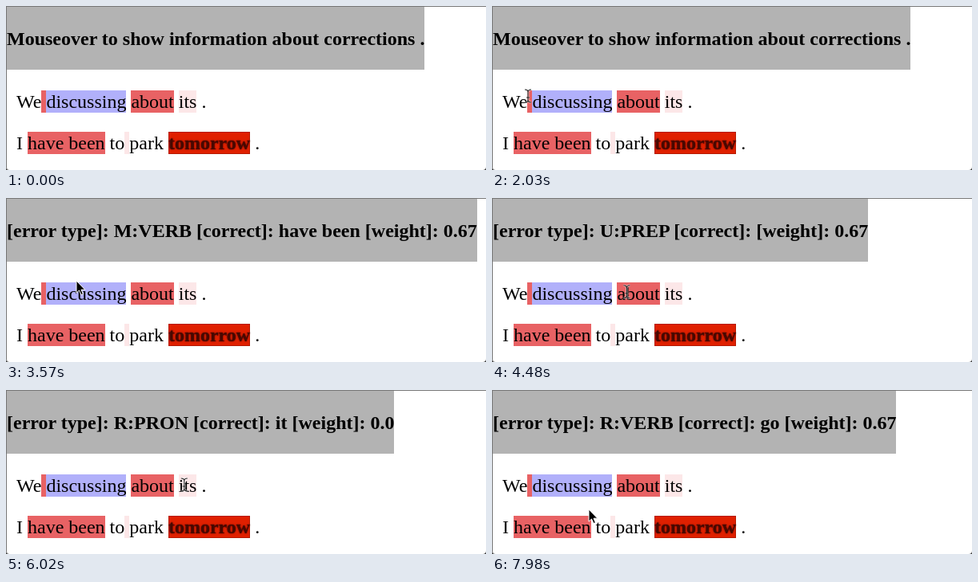
Write an HTML page that moves like this. It is 600 px wide and 206 px high and loops after 8000 ms.

```html
<!DOCTYPE html>
<html lang="en">
<head>
<meta charset="utf-8">
<title>Corrections</title>
<style>
  html, body { margin: 0; width: 100%; height: 100%; overflow: hidden; background: #fff; }
  #stage {
    position: relative; width: 600px; height: 206px; overflow: hidden;
    font: 24px "Liberation Serif", "Times New Roman", serif; color: #000; cursor: default;
  }
  #info, p { position: absolute; margin: 0; white-space: pre; }
  #info { left: 1px; top: 0; height: 80px; line-height: 82px; font-weight: bold; background: #b3b3b3; }
  p { left: 13px; line-height: 28px; }
  p span { padding: 1px 0; }
  .red { background: #e86264; }
  .blue { background: #b1b0fa; }
  .pink { background: #fce7e8; }
  .hot {
    background: #e02000; color: #480800; font-weight: bold;
    text-shadow: 0 0 2px #300; box-shadow: inset 0 0 0 1px #b51a00;
  }
  #edge {
    position: absolute; inset: 0; box-sizing: border-box;
    border: solid #777; border-width: 1px 0 0 1px;
    border-radius: 0 0 4px 4px; box-shadow: 0 0 0 5px #333;
  }
  svg { position: absolute; left: 0; top: 0; width: 100%; height: 100%; }
</style>
</head>
<body>
<div id="stage">
  <div id="info"></div>
  <p style="top:106px">We<span class="red"> </span><span class="blue">discussing</span> <span class="red">about</span> <span class="pink">its</span> .</p>
  <p style="top:158px">I <span class="red">have been</span> to<span class="pink"> </span>park <span class="hot">tomorrow</span> .</p>
  <div id="edge"></div>
  <svg viewBox="0 0 600 206">
    <g id="pointer">
      <path id="arrow" d="M0 0V15.2L3.5 12L6 17.6L8.4 16.5L6 11.2H10.8Z" fill="#000" stroke="#fff" stroke-width="1"/>
      <g id="beam" fill="none">
        <path d="M-4 -8Q0 -8 0 -5Q0 -8 4 -8M0 -5V5M-4 8Q0 8 0 5Q0 8 4 8M-2 2H2" stroke="#fff" stroke-opacity=".6" stroke-width="2.6"/>
        <path d="M-4 -8Q0 -8 0 -5Q0 -8 4 -8M0 -5V5M-4 8Q0 8 0 5Q0 8 4 8M-2 2H2" stroke="#222" stroke-width="1.1"/>
      </g>
    </g>
  </svg>
</div>
<script>
const LOOP = 8000, STEP = 70;
const get = id => document.getElementById(id);
const info = get("info"), pointer = get("pointer"), arrow = get("arrow"), beam = get("beam");

const detail = (type, fix, weight) =>
  `[error type]: ${type} [correct]: ${fix ? fix + " " : ""}[weight]: ${weight}`;

// [start ms, text]
const messages = [
  [0, "Mouseover to show information about corrections ."],
  [2100, detail("M:VERB", "have been", "0.67")],
  [3710, detail("U:PREP", "", "0.67")],
  [5880, detail("R:PRON", "it", "0.0")],
  [7560, detail("R:VERB", "go", "0.67")]
];

// [ms, x, y]
const path = [
  [980, 282, 62], [1750, 66, 98], [2030, 45, 113], [2240, 48, 118],
  [2940, 48, 118], [3570, 88, 104], [3710, 168, 118], [4410, 168, 118],
  [5110, 181, 108], [5460, 183, 110], [5880, 222, 118], [6300, 225, 122],
  [6790, 204, 143], [7140, 180, 150], [7560, 116, 164], [7770, 112, 166],
  [7980, 121, 150]
];

const ease = u => u * u * (3 - 2 * u);

function place(t) {
  let i = 0;
  while (i < path.length - 2 && t >= path[i + 1][0]) i++;
  const [t0, x0, y0] = path[i], [t1, x1, y1] = path[i + 1];
  const u = ease(Math.min(1, Math.max(0, (t - t0) / (t1 - t0))));
  return [x0 + (x1 - x0) * u, y0 + (y1 - y0) * u];
}

const overText = y => (y >= 106 && y < 134) || (y >= 158 && y < 186);

function draw(now) {
  const t = Math.floor((now % LOOP) / STEP) * STEP;
  const text = messages.filter(m => m[0] <= t).pop()[1];
  if (info.textContent !== text) info.textContent = text;

  const [x, y] = place(t), typing = overText(y);
  pointer.style.display = t < path[0][0] ? "none" : "";
  pointer.setAttribute("transform", `translate(${x.toFixed(1)} ${y.toFixed(1)})`);
  arrow.style.display = typing ? "none" : "";
  beam.style.display = typing ? "" : "none";
}

const start = performance.now();
function tick() {
  draw(performance.now() - start);
  requestAnimationFrame(tick);
}
tick();
</script>
</body>
</html>
```
